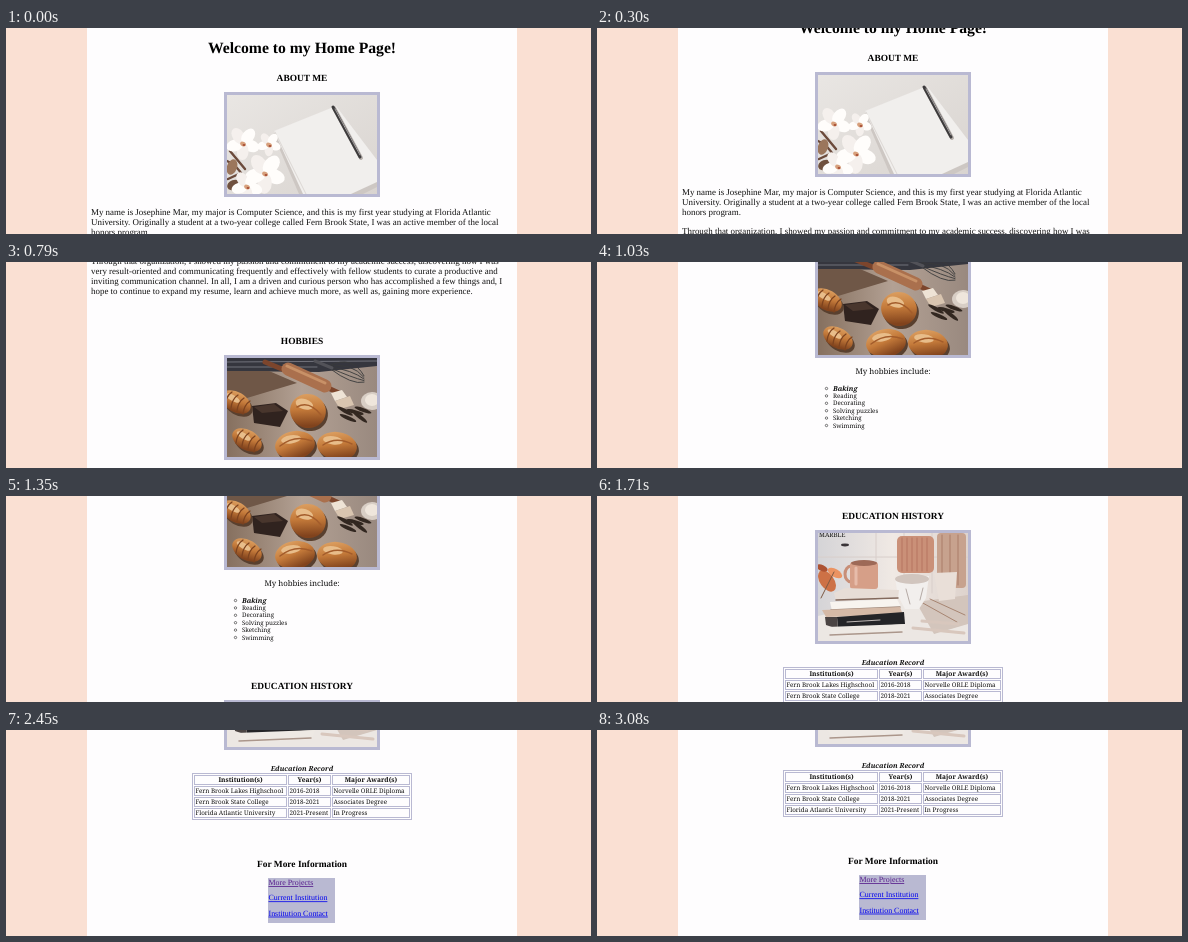
An HTML page for the animation above (3.48 s loop, 585 by 206 pixels).

```html
<!DOCTYPE html>
<html lang="en">
<head>
<meta charset="utf-8">
<title>Home Page</title>
<style>
html, body { margin: 0; width: 100%; height: 100%; overflow: hidden; background: #fae0d3; }
svg { display: block; }
text { font: 8.93px "Liberation Serif", "Times New Roman", serif; fill: #111; text-rendering: geometricPrecision; white-space: pre; }
.mid { text-anchor: middle; }
.h1 { font-size: 15.7px; font-weight: bold; fill: #000; }
.h2 { font-size: 9.42px; font-weight: bold; fill: #000; }
.intro, .item, .cell, .head, .strong { font-family: "Noto Serif", Georgia, serif; }
.intro { font-size: 7.83px; }
.item { font-size: 6.16px; }
.cell { font-size: 6.3px; }
.head { font-size: 6.6px; font-weight: bold; }
.strong { font-size: 6.9px; font-weight: bold; font-style: italic; }
.link { font-size: 7.95px; fill: #0000ee; text-decoration: underline; }
.seen { fill: #551a8b; }
</style>
</head>
<body>
<svg width="585" height="206" viewBox="0 0 585 206">
  <defs>
    <linearGradient id="desk" x2="1" y2="1"><stop stop-color="#e9e6e3"/><stop offset="1" stop-color="#d9d4d0"/></linearGradient>
    <linearGradient id="board" x2="1"><stop stop-color="#86705f"/><stop offset=".5" stop-color="#b3a194"/><stop offset="1" stop-color="#99897f"/></linearGradient>
    <linearGradient id="crust" x2=".4" y2="1"><stop stop-color="#e3aa6c"/><stop offset=".55" stop-color="#c47a3a"/><stop offset="1" stop-color="#81431d"/></linearGradient>
    <linearGradient id="wall" x2="1"><stop stop-color="#d5d4d7"/><stop offset=".5" stop-color="#f0e9e4"/><stop offset="1" stop-color="#ded3cd"/></linearGradient>
  </defs>
  <rect width="585" height="206" fill="#fae0d3"/>
  <rect x="81" width="430" height="206" fill="#fefdfe"/>
  <g id="page"></g>
</svg>
<script>
const LILAC = "#b9b9d2";
const page = document.getElementById("page");

const text = (cls, x, y, s) => `<text class="${cls}" x="${x}" y="${y}">${s}</text>`;
const mid = (cls, y, s, x = 296) => text(cls + " mid", x, y, s);
const rect = (x, y, w, h, fill, extra = "") => `<rect x="${x}" y="${y}" width="${w}" height="${h}" fill="${fill}" ${extra}/>`;
const frame = (x, y, w, h) => rect(x + .5, y + .5, w - 1, h - 1, "none", `stroke="${LILAC}"`);
const poly = (points, fill) => `<polygon points="${points}" fill="${fill}"/>`;
const line = (d, color, w = 1) => `<path d="${d}" fill="none" stroke="${color}" stroke-width="${w}" stroke-linecap="round"/>`;
const oval = (x, y, rx, ry, fill, turn = 0) =>
  `<ellipse rx="${rx}" ry="${ry}" fill="${fill}" transform="translate(${x} ${y}) rotate(${turn})"/>`;

// Bordered picture; its content is laid out inside a 150px wide box.
const photo = (y, h, art) => rect(218, y, 156, h, LILAC) +
  `<svg x="221" y="${y + 3}" width="150" height="${h - 6}">${art}</svg>`;

function flower(x, y, size) {
  let s = "";
  for (let i = 0; i < 5; i++) {
    const a = i * 72 + 20, r = a * Math.PI / 180;
    s += oval(x + Math.cos(r) * size * .6, y + Math.sin(r) * size * .6, size * .62, size * .42, i % 2 ? "#f5f0ed" : "#fffdfb", a);
  }
  return s + oval(x, y + 1, 3, 2.2, "#d7a07c", 30) + oval(x + 1, y + 2, 1.4, 1, "#a84d34");
}

const stationery = rect(0, 0, 150, 99, "url(#desk)") +
  poly("46,39 110,14 150,68 150,92 136,99 72,99", "#cdc7c3") +
  poly("47,36 109,11 150,65 150,87 124,99 76,99", "#f1efed") +
  line("M48 37 L79 99", "#dcd7d4") +
  line("M107 13 L134 63", "#b7b1ad", 4) +
  line("M106 12 L133 62", "#3d3b3c", 3) +
  line("M108 14 L133 60", "#a5a1a1") +
  line("M0 66 Q15 72 22 96 M3 56 L18 74 M1 84 L14 78", "#6b4a3b", 2.4) +
  oval(5, 72, 5, 8, "#9b765c", 20) + oval(7, 90, 7, 5, "#70513f", -20) +
  flower(16, 48, 14) + flower(38, 78, 17) + flower(20, 91, 13) + flower(42, 49, 10);

const bun = (x, y, rx, ry, turn = 0) =>
  oval(x + 2, y + 3, rx, ry, "#59402f", turn) + oval(x, y, rx, ry, "url(#crust)", turn) +
  oval(x - rx * .2, y - ry * .4, rx * .5, ry * .3, "#e8bd8a", turn);

const croissant = (x, y) => bun(x, y, 16, 10, 30) +
  [-8, -2, 4, 10].map(d => line(`M${x + d - 3} ${y + d * .5 + 7} q1 -9 7 -13`, "#7d431f", 1.3)).join("");

const baking = rect(0, 0, 150, 99, "url(#board)") +
  poly("0,0 150,0 150,8 92,14 0,13", "#35363e") +
  line("M0 9 L90 9 M0 4 L150 3", "#71727b") +
  poly("0,13 42,13 70,25 20,40 0,36", "#6f5747") +
  line("M38 4 L62 14 M99 29 L112 35", "#7c452c", 5) +
  line("M61 11 L98 28", "#aa704d", 13) +
  line("M60 8 L98 25", "#c89167", 3) +
  [-8, -4, 0, 4, 8].map(d => line(`M103 ${9 + d * .2} Q125 ${12 + d * 1.9} 137 ${21 + d * .4}`, "#393a3c", .9)).join("") +
  line("M88 3 L105 10", "#525258", 3) +
  oval(145, 43, 11, 9, "#d8cec5") + oval(145, 42, 7, 6, "#efe6dc") +
  poly("104,35 115,32 120,39 108,43", "#eee3d5") + poly("108,43 123,38 127,47 113,51", "#d9c5b0") +
  poly("25,48 49,45 61,53 53,69 27,65", "#30231f") + poly("27,49 47,46 56,53 35,55", "#49362d") +
  [[118, 53, 30], [128, 54, 15], [133, 59, 38], [121, 60, 24], [136, 52, 20]]
    .map(([x, y, a]) => oval(x, y, 9, 1.9, "#322720", a)).join("") +
  croissant(9, 44) + croissant(20, 82) + bun(81, 53, 18, 17, 18) +
  bun(68, 87, 20, 14, -8) + bun(110, 88, 20, 14, 8) +
  line("M53 88 Q68 76 85 83 M96 87 Q109 78 125 86 M70 49 Q82 42 94 57", "#a35c2b", 1.5);

const shelf = rect(0, 0, 150, 108, "url(#wall)") +
  text("cell", 1, 4, "MARBLE") + oval(27, 12, 4, 1.4, "#393438") +
  line("M58 0 V70 M86 0 V60 M114 0 V60 M0 24 H150", "#d8ceca") +
  rect(79, 3, 37, 37, "#ca9078", 'rx="5"') +
  [84, 89, 94, 99, 104, 109].map(x => line(`M${x} 5 V38`, "#b67561")).join("") +
  rect(119, 0, 29, 55, "#c7a28e", 'rx="4"') +
  line("M124 2 V52 M132 2 V52 M140 2 V52", "#aa7d68") +
  poly("0,83 62,69 150,74 150,108 0,108", "#ece7e3") +
  poly("98,69 150,62 150,91 116,101", "#d3c5bc") +
  line("M103 69 L139 89 M112 66 L147 82", "#a78572") +
  oval(9, 48, 7, 12, "#cd7146", -35) + oval(17, 40, 8, 4, "#eb9362", 30) +
  oval(4, 35, 6, 3, "#ad5232", 25) + line("M3 65 L16 39", "#7c5944") +
  poly("77,45 111,43 108,65 101,76 87,76 80,63", "#f2efed") +
  oval(94, 46, 17, 5, "#d1c5be") + line("M88 56 L92 71 M105 55 L102 67", "#b5aaa5") +
  poly("116,40 139,39 137,66 121,68", "#e9dfd8") +
  oval(33, 39, 7, 10, "none") +
  `<ellipse cx="33" cy="41" rx="6" ry="8" fill="none" stroke="#c88e77" stroke-width="3"/>` +
  rect(32, 29, 28, 27, "#d69f88", 'rx="3"') + oval(46, 30, 13, 3, "#9d6957") +
  line("M38 35 V51", "#e7bcaa", 3) +
  poly("16,60 27,55 81,57 80,65 18,68", "#e7ddd6") + line("M18 67 L80 65", "#83695c", 1.5) +
  poly("12,69 79,66 83,74 14,78", "#f8f4ef") + line("M13 77 L82 74", "#9e8779", 1.5) +
  poly("4,77 82,74 85,82 8,84", "#d5b9a6") +
  poly("19,84 86,79 87,91 20,96", "#242427") + line("M29 89 L62 87", "#bfb8b5") +
  poly("7,84 19,84 20,96 8,92", "#4b4443") +
  poly("9,94 88,91 85,100 16,104", "#eee9e4") + line("M12 102 L84 99", "#ab968b", 1.5) +
  line("M95 95 L146 100 M104 88 L140 91", "#d8c7bd", 3);

const paragraphs = [
  [187, "My name is Josephine Mar, my major is Computer Science, and this is my first year studying at Florida Atlantic",
    "University. Originally a student at a two-year college called Fern Brook State, I was an active member of the local",
    "honors program."],
  [226, "Through that organization, I showed my passion and commitment to my academic success, discovering how I was",
    "very result-oriented and communicating frequently and effectively with fellow students to curate a productive and",
    "inviting communication channel. In all, I am a driven and curious person who has accomplished a few things and, I",
    "hope to continue to expand my resume, learn and achieve much more, as well as, gaining more experience."]
];
paragraphs[1][1] = paragraphs[1][1].replace(/ was$/, "");
paragraphs[1][1] = paragraphs[1][1].replace(/ I$/, " I was").replace("discovering how I was", "discovering how I was");

const hobbies = ["Baking", "Reading", "Decorating", "Solving puzzles", "Sketching", "Swimming"];
const records = [
  ["Institution(s)", "Year(s)", "Major Award(s)"],
  ["Fern Brook Lakes Highschool", "2016-2018", "Norvelle ORLE Diploma"],
  ["Fern Brook State College", "2018-2021", "Associates Degree"],
  ["Florida Atlantic University", "2021-Present", "In Progress"]
];
const columns = [[188, 93], [282, 43], [326, 78]];
const links = ["More Projects", "Current Institution", "Institution Contact"];

page.innerHTML =
  mid("h1", 25, "Welcome to my Home Page!") +
  mid("h2", 53, "ABOUT ME") + photo(64, 105, stationery) +
  paragraphs.map(([y, ...rows]) => rows.map((s, i) => text("", 85, y + i * 10, s)).join("")).join("") +
  mid("h2", 306, "HOBBIES") + photo(317, 105, baking) +
  mid("intro", 438, "My hobbies include:") +
  hobbies.map((s, i) => {
    const y = 454.5 + i * 7.4;
    return `<circle cx="229.5" cy="${y - 2}" r="1.2" fill="none" stroke="#222" stroke-width=".6"/>` +
      text(i ? "item" : "strong", 236, y, s);
  }).join("") +
  mid("h2", 541, "EDUCATION HISTORY") + photo(552, 114, shelf) +
  mid("strong", 687, "Education Record") + frame(186, 689, 220, 47) +
  records.map((row, r) => row.map((s, c) => {
    const [x, w] = columns[c], y = 698 + r * 11;
    return frame(x, y - 7, w, 10) + (r ? text("cell", x + 1.5, y, s) : mid("head", y, s, x + w / 2));
  }).join("")).join("") +
  mid("h2", 783, "For More Information") + rect(262, 794, 67, 45, LILAC) +
  links.map((s, i) => text(i ? "link" : "link seen", 262.5, 801 + i * 15.3, s)).join("");

const easeIn = p => p ** 1.6;
const easeOut = p => 1 - (1 - p) ** 1.6;
const easeBoth = p => p * p * (3 - 2 * p);
const linear = p => p;

// first step, last step, step count, distance, easing
const scrolls = [
  [120, 610, 7, 76, easeIn],
  [670, 1030, 7, 250, easeOut],
  [1230, 1350, 3, 22, easeIn],
  [1410, 1710, 6, 170, linear],
  [1770, 1950, 4, 109, easeOut],
  [2150, 2570, 8, 22, easeBoth]
];

function scrollAt(t) {
  let y = 0;
  for (const [start, end, steps, distance, ease] of scrolls) {
    if (t < start) break;
    const step = Math.min(steps, Math.floor((t - start) / (end - start) * (steps - 1) + 1e-6) + 1);
    y += distance * ease(step / steps);
  }
  return Math.round(y);
}

function draw() {
  page.setAttribute("transform", `translate(0 ${-scrollAt(performance.now() % 3480)})`);
  requestAnimationFrame(draw);
}
draw();
</script>
</body>
</html>
```
